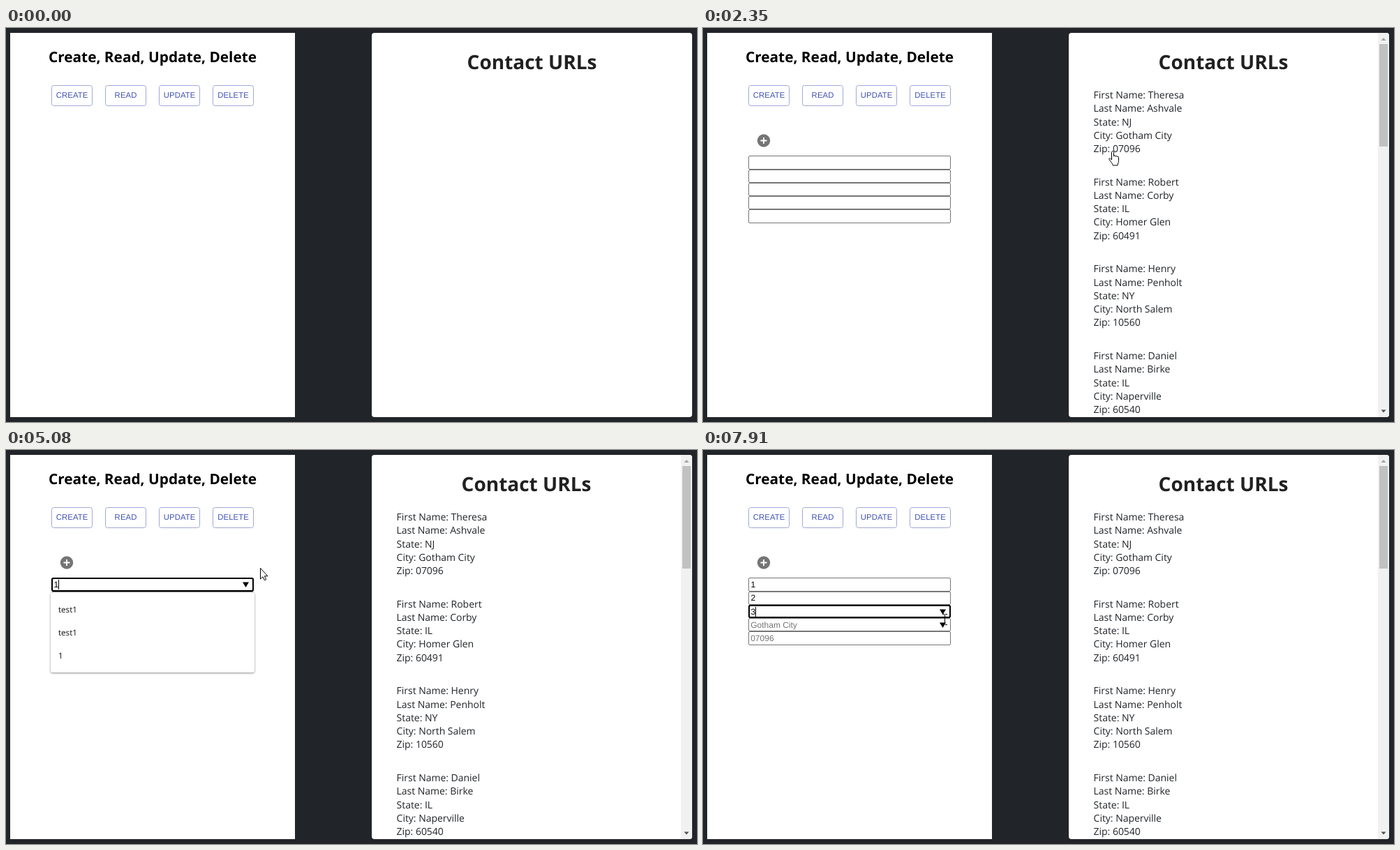
An HTML page that plays this animation: 990 px wide and 565 px high, repeating every 8000 ms.

```html
<!DOCTYPE html>
<html lang="en">
<head>
<meta charset="utf-8">
<title>Create, Read, Update, Delete</title>
<style>
  html, body { margin: 0; width: 100%; height: 100%; overflow: hidden; background: #212429; }
  svg { display: block; width: 990px; height: 565px; }
  text { white-space: pre; text-rendering: geometricPrecision; }
  .title { font: 700 20.8px "Open Sans", "Noto Sans", sans-serif; text-anchor: middle; }
  .head { font: 700 28px "Open Sans", "Noto Sans", sans-serif; text-anchor: middle; fill: #212121; }
  .line { font: 14px "Open Sans", "Noto Sans", sans-serif; letter-spacing: -.03px; fill: #212529; }
  .label { font: 11.3px "Liberation Sans", Arial, sans-serif; letter-spacing: .15px; text-anchor: middle; fill: #3f51b5; }
  .button { fill: #fff; stroke: #9fa8da; }
  .input { fill: #fff; stroke: #767676; }
  .focus { fill: none; stroke: #000; stroke-width: 2; }
  .value { font: 12px "Liberation Sans", Arial, sans-serif; fill: #000; }
  .hint { fill: #757575; }
  .menu { fill: #fff; filter: drop-shadow(0 1px 1.5px rgba(0, 0, 0, .45)); }
  .item { font: 11.6px "Open Sans", "Noto Sans", sans-serif; fill: #101010; }
  .cursor { fill: #fff; stroke: #000; stroke-linejoin: round; }
</style>
</head>
<body>
<svg viewBox="0 0 990 565">
  <defs>
    <clipPath id="card"><rect x="524" y="7" width="459" height="551" rx="4"/></clipPath>
    <path id="arrow" d="M.5.5V16L4 12.8 6.4 17.8 8.7 16.8 6.4 11.8H11Z"/>
    <path id="hand" d="M4.5 13V2.2C4.5.2 7.5.2 7.5 2.2V8c0-1.5 2.6-1.4 2.6.3 0-1.3 2.4-1.2 2.4.5 0-1.2 2-1 2 .8v5c0 2.5-1.5 3.6-1.5 6.4H6.3C6 18.5 3.5 16.5 1 12.6 0 10.8 2.5 10 4.5 13Z"/>
    <path id="beam" fill="none" d="M0 .5H3M4 .5H7M3.5 1V15M0 15.5H3M4 15.5H7"/>
  </defs>
  <rect x="6" y="7" width="408" height="551" fill="#fff"/>
  <text class="title" x="210" y="48.5">Create, Read, Update, Delete</text>
  <g id="buttons"></g>
  <rect x="524" y="7" width="459" height="551" rx="4" fill="#fff"/>
  <g id="scene"></g>
</svg>
<script>
const LOOP = 8000;
const FORM_AT = 860, HINTS_AT = 3220;

const contacts = [
  ['Theresa', 'Ashvale', 'NJ', 'Gotham City', '07096'],
  ['Robert', 'Corby', 'IL', 'Homer Glen', '60491'],
  ['Henry', 'Penholt', 'NY', 'North Salem', '10560'],
  ['Daniel', 'Birke', 'IL', 'Naperville', '60540']
];
const fields = ['First Name', 'Last Name', 'State', 'City', 'Zip'];
const column = i => contacts.map(c => c[i]);
const firstNames = [...column(0), 'Oscar', 'Felix', 'Duncan', 'Louis', 'Neil', 'Simon', 'Tabitha'];
const lastNames = [...column(1), 'Rowan', 'Mabley', 'Calder', 'Tolby', 'Finch', 'Garside', 'Norley'];
const states = [...column(2), 'NY', 'OH', 'NY', 'MO', 'CA', 'NY', 'TX'];

// time, left, top, shape
const pointer = [
  [50, 206, 120, 'arrow'], [300, 198, 112, 'arrow'], [410, 184, 92, 'hand'], [520, 175, 82, 'hand'],
  [1200, 300, 108, 'arrow'], [1320, 459, 133, 'arrow'], [1460, 669, 117, 'hand'], [1650, 643, 107, 'hand'],
  [1880, 630, 112, 'hand'], [2000, 612, 132, 'hand'], [2120, 594, 158, 'hand'], [2230, 581, 176, 'hand'],
  [2450, 606, 128, 'hand'], [2670, 612, 86, 'hand'], [2780, 617, 112, 'hand'], [2880, 606, 150, 'hand'],
  [2990, 598, 108, 'hand'], [3220, 541, 146, 'arrow'], [3330, 418, 172, 'arrow'], [3430, 320, 186, 'beam'],
  [3750, 285, 186, 'beam'], [3870, 280, 205, 'arrow'], [4120, 271, 256, 'arrow'], [4330, 246, 252, 'arrow'],
  [4560, 216, 180, 'beam'], [4710, 205, 178, 'beam'], [4850, 290, 166, 'arrow'], [5080, 364, 169, 'arrow'],
  [5310, 366, 215, 'arrow'], [5650, 365, 270, 'arrow'], [5760, 391, 290, 'arrow'], [6010, 330, 244, 'arrow'],
  [6120, 230, 214, 'beam'], [6230, 174, 212, 'beam'], [6430, 174, 215, 'beam'], [6880, 260, 218, 'beam'],
  [7080, 406, 224, 'arrow'], [7190, 405, 228, 'arrow'], [7310, 349, 226, 'beam'], [7430, 343, 227, 'beam'],
  [7910, 343, 235, 'beam']
];
const focus = [[3640, 0], [6010, -1], [6230, 1], [7190, -1], [7430, 2]];
const menus = [
  [3750, firstNames], [4970, ['test1', 'test1', '1']], [6010, null],
  [6430, lastNames], [6540, ['2']], [7190, null], [7570, states], [7680, null]
];
const typedAt = [4970, 6540, 7680];

const latest = (list, t) => list.filter(e => e[0] <= t).pop();
const rowTop = i => Math.round(183.4 + 19.25 * i);
const rowBase = i => Math.round(197 + 19.3 * i);
const text = (cls, x, y, s) => `<text class="${cls}" x="${x}" y="${y}">${s}</text>`;
const rect = (cls, x, y, w, h, r = 0) => `<rect class="${cls}" x="${x}" y="${y}" width="${w}" height="${h}" rx="${r}"/>`;
const block = (x, y, w, h, fill) => `<rect x="${x}" y="${y}" width="${w}" height="${h}" fill="${fill}"/>`;

document.getElementById('buttons').innerHTML = ['CREATE', 'READ', 'UPDATE', 'DELETE'].map((s, i) =>
  rect('button', 65.5 + 77 * i, 82.5, 58, 29, 3) + text('label', 94.6 + 77 * i, 100, s)).join('');

const scrollbar = `<g clip-path="url(#card)">${block(967, 7, 16, 551, '#f1f1f1')}${block(969, 23, 12, 147, '#c1c1c1')}
  <path d="M971.5 18H978.5L975 14Z" fill="#a3a3a3"/><path d="M971.5 547.5H978.5L975 551.5Z" fill="#505050"/></g>`;
const listing = scrollbar + contacts.map((c, i) => c.map((v, j) =>
  text('line', 559.6, Math.round(101 + 124.7 * i + 19.25 * j), `${fields[j]}: ${v}`)).join('')).join('');
const plusIcon = '<circle cx="87" cy="161.5" r="9.2" fill="#757575"/><path d="M82.5 161.5H91.5M87 157V166" stroke="#fff" stroke-width="1.9"/>';

function inputs(t, active, hot) {
  let out = '';
  for (let i = 0; i < 5; i++) {
    const top = rowTop(i), h = rowTop(i + 1) - top, base = rowBase(i);
    const typed = t >= typedAt[i];
    out += rect('input', 65.5, top + .5, 289, h - 1, 1.5);
    if (typed) out += text('value', 68.4, base, i + 1);
    else if (t >= HINTS_AT) out += text('value hint', 68.2, base, contacts[0][i]);
    if (i === active || i === hot) out += `<path d="M339 ${base - 7.5}h9l-4.5 7.5Z"/>`;
    if (i === active) out += block(typed ? 75 : 69, base - 11, 1, 14, '#000');
  }
  if (active >= 0) {
    const top = rowTop(active);
    out += rect('focus', 66, top + 1, 288, rowTop(active + 1) - top - 2, 2);
  }
  return out;
}

function menu(items, row, p) {
  const top = rowTop(row + 1) + 1;
  let out = rect('menu', 64, top, 292, 16 + 33 * items.length, 3);
  items.forEach((s, i) => {
    const y = top + 8 + 33 * i;
    const over = p[3] === 'arrow' && p[1] >= 64 && p[1] < 356 && p[2] >= y && p[2] < y + 33;
    if (over) out += block(64, y, 292, 33, '#c8c8c8');
    out += text('item', 75, y + 21, s);
  });
  return out;
}

function scene(t) {
  const shown = t >= FORM_AT;
  const p = latest(pointer, t);
  const active = (latest(focus, t) || [0, -1])[1];
  const items = (latest(menus, t) || [])[1];
  let out = text('head', shown ? 745.5 : 753.5, 59, 'Contact URLs');
  if (shown) {
    const hot = p[3] === 'beam' ? Math.floor((p[2] + 8 - 183.4) / 19.25) : -1;
    out += listing + plusIcon + inputs(t, active, hot);
  }
  if (items) out += menu(items, active, p);
  if (p) out += `<use class="cursor" href="#${p[3]}" x="${p[1]}" y="${p[2]}"/>`;
  return out;
}

const layer = document.getElementById('scene');
const start = performance.now();
let last = '';
function frame() {
  const next = scene((performance.now() - start) % LOOP);
  if (next !== last) layer.innerHTML = last = next;
  requestAnimationFrame(frame);
}
frame();
</script>
</body>
</html>
```
